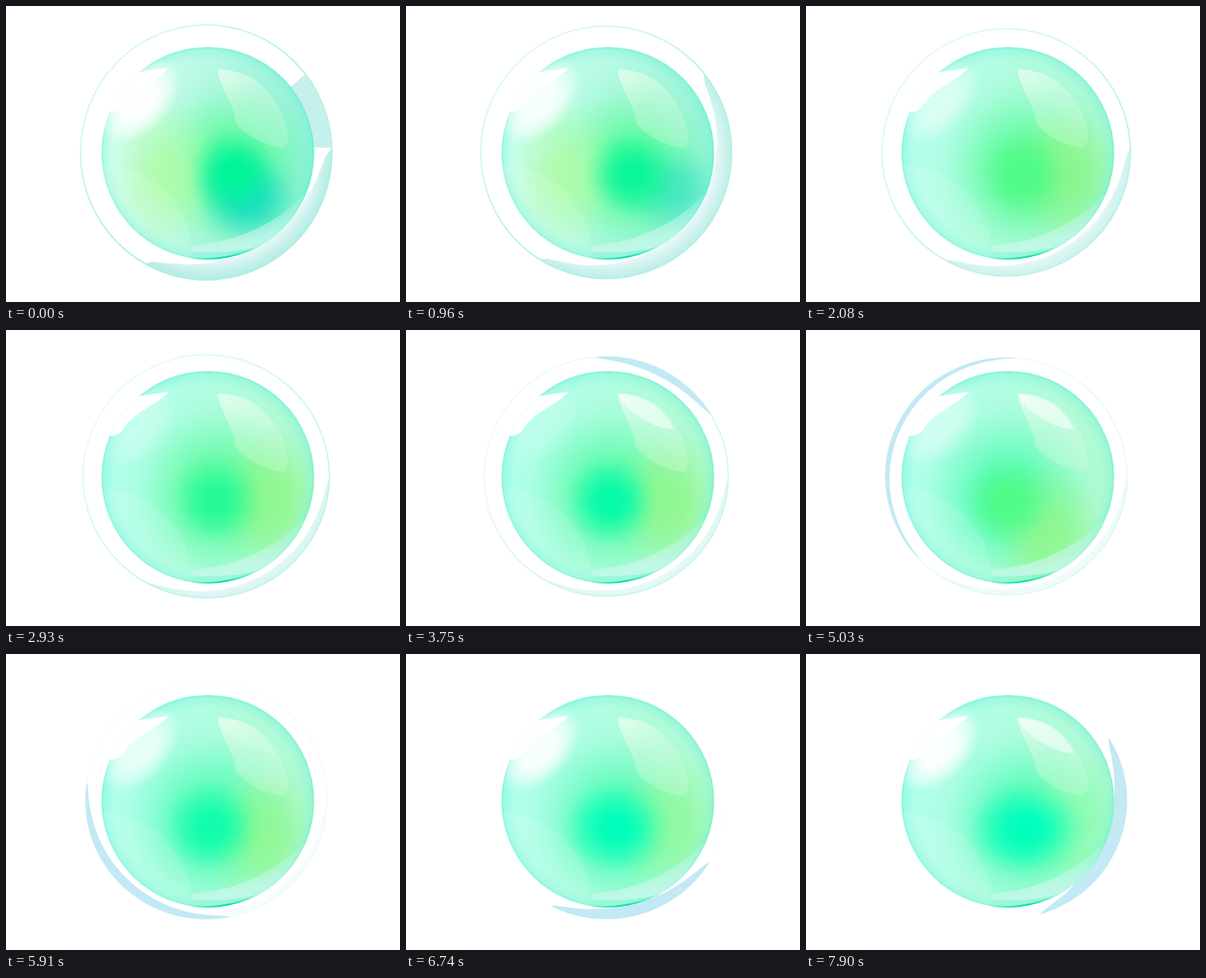
Animation of 492x370 px, one loop 8 s. Source, as an HTML page:

```html
<!DOCTYPE html>
<html lang="en">
<head>
<meta charset="utf-8">
<title>Glass orb</title>
<style>
  html, body { margin: 0; width: 100%; height: 100%; overflow: hidden; background: #fff; }
  svg { display: block; width: 100%; height: 100%; }
</style>
</head>
<body>
<svg viewBox="0 0 492 370">
  <defs id="defs">
    <clipPath id="ball"><circle cx="252" cy="184" r="132.8"/></clipPath>
    <linearGradient id="base" x1="0" y1=".4" x2="1" y2=".6"><stop/><stop offset="1"/></linearGradient>
    <radialGradient id="rim">
      <stop offset=".88" stop-color="#70f0d8" stop-opacity="0"/>
      <stop offset=".97" stop-color="#70f0d8" stop-opacity=".3"/>
      <stop offset="1" stop-color="#48e8cc" stop-opacity=".5"/>
    </radialGradient>
    <radialGradient id="haze">
      <stop offset=".4" stop-color="#fff"/>
      <stop offset=".7" stop-color="#fff" stop-opacity=".6"/>
      <stop offset="1" stop-color="#fff" stop-opacity="0"/>
    </radialGradient>
    <radialGradient id="mint" gradientUnits="userSpaceOnUse" cx="250" cy="183">
      <stop offset=".85" stop-color="#c6f0ec" stop-opacity=".35"/>
      <stop offset=".95" stop-color="#c6f0ec"/>
      <stop offset="1" stop-color="#b4eee4"/>
    </radialGradient>
    <linearGradient id="edge" x1="0" y1="0" x2="1" y2="1">
      <stop offset=".1" stop-color="#a8f2e4" stop-opacity=".45"/>
      <stop offset=".6" stop-color="#a4eee0"/>
    </linearGradient>
    <linearGradient id="shine" x1=".2" y1="0" x2=".8" y2="1">
      <stop stop-color="#f4fff0" stop-opacity=".6"/>
      <stop offset=".4" stop-color="#ecfbe8" stop-opacity=".32"/>
      <stop offset="1" stop-color="#e6f8e4" stop-opacity=".25"/>
    </linearGradient>
    <linearGradient id="sweep" x1=".4" y1=".3" x2=".6" y2=".8">
      <stop stop-color="#c4f6ea" stop-opacity=".25"/>
      <stop offset="1" stop-color="#ccf8ee" stop-opacity=".75"/>
    </linearGradient>
    <linearGradient id="foot">
      <stop stop-color="#00e0b0" stop-opacity="0"/>
      <stop offset=".35" stop-color="#00e0b0"/>
      <stop offset=".65" stop-color="#00e0b0"/>
      <stop offset="1" stop-color="#00e0b0" stop-opacity="0"/>
    </linearGradient>
  </defs>

  <g id="ring"><ellipse id="hoop" cx="250" cy="183" fill="none" stroke="url(#edge)" stroke-width="1.8"/></g>

  <g clip-path="url(#ball)">
    <rect x="119" y="51" width="266" height="266" fill="url(#base)"/>
    <g id="blobs"></g>
    <circle cx="252" cy="184" r="133" fill="url(#rim)"/>
    <path d="M118 200C150 195 190 218 206 240C222 258 234 285 231 318H118Z" fill="#fff" opacity=".1"/>
    <path d="M232 300C290 295 335 273 372 236L378 250C355 285 325 302 294 305C270 308 245 308 232 307Z" fill="url(#sweep)"/>
    <path d="M195 308Q252 327 322 299Q252 333 195 308Z" fill="url(#foot)"/>
    <path d="M264 80C275 78 297 84 307 90C333 106 347 132 351 154C354 170 350 178 342 177C320 174 295 158 287 146C285 122 268 104 264 80Z" fill="url(#shine)"/>
    <path id="glint" fill="#fff" d="M264 80C290 78 325 98 334 124C312 124 275 104 264 80Z"/>
    <ellipse id="cloud" cx="167" cy="119" rx="64" ry="38" transform="rotate(-48 167 119)" fill="url(#haze)"/>
    <path d="M160 84C175 80 192 80 203 77C192 92 160 102 148 122C142 130 138 132 128 133L108 130L130 80Z" fill="#fff"/>
  </g>
</svg>
<script>
const NS = 'http://www.w3.org/2000/svg';
const $ = id => document.getElementById(id);
const LOOP = 8000, HOLD = 145, FIRST = 390;

const lerp = (a, b, u) => a + (b - a) * u;
const clamp = u => Math.min(1, Math.max(0, u));
const ease = (t, a, b) => { const u = clamp((t - a) / (b - a)); return u * u * (3 - 2 * u); };
const bump = (t, mid, width) => Math.exp(-(((t - mid) / width) ** 2));
const rgb = c => typeof c === 'string' ? [1, 3, 5].map(i => parseInt(c.slice(i, i + 2), 16)) : c;
const mix = (a, b, u) => { const q = rgb(b); return rgb(a).map((v, i) => lerp(v, q[i], clamp(u))); };

function set(el, attrs) {
  for (const k in attrs) el.setAttribute(k, attrs[k]);
}
function make(tag, parent, attrs) {
  const el = document.createElementNS(NS, tag);
  set(el, attrs);
  return parent.appendChild(el);
}

// Soft coloured spot whose alpha falls off smoothly from a flat middle
function makeBlob(id) {
  const grad = make('radialGradient', $('defs'), { id });
  const stops = [];
  for (let r = 0; r <= 1; r += 0.125)
    stops.push(make('stop', grad, { offset: r, 'stop-opacity': 1 - ease(r, 0.1, 1) }));
  const el = make('ellipse', $('blobs'), { fill: `url(#${id})` });
  return (cx, cy, rx, ry, color, opacity) => {
    set(el, { cx, cy, rx, ry, opacity });
    for (const s of stops) set(s, { 'stop-color': `rgb(${color.map(Math.round)})` });
  };
}
const [body, glow, teal, core] = ['body', 'glow', 'teal', 'core'].map(makeBlob);

// Stretch of the ring, thickest in the middle; angles in degrees
function makeArc(fill) {
  const el = make('path', $('ring'), { fill });
  return (rx, ry, mid, span, width, taper, opacity) => {
    const n = 48, outer = [], inner = [];
    for (let i = 0; i <= n; i++) {
      const u = i / n, a = (mid + (u - 0.5) * span) * Math.PI / 180;
      const w = width * Math.max(0, Math.sin(Math.PI * u)) ** taper;
      const point = d => `${(250 + (rx - d) * Math.cos(a)).toFixed(2)} ${(183 + (ry - d) * Math.sin(a)).toFixed(2)}`;
      outer.push(point(0));
      inner.unshift(point(w));
    }
    set(el, { d: `M${outer.concat(inner).join('L')}Z`, opacity });
  };
}
const patch = makeArc('#c6f0ec'), shade = makeArc('url(#mint)'), sheen = makeArc('#c2e9f4');

// The blue sheen turns around the ring: time, angle, span, width
const turn = [[3750, 297, 64, 9], [5030, 205, 140, 6], [6740, 65, 82, 15], [7900, 16, 108, 19]];
function along(path, t) {
  const i = Math.max(1, path.findIndex(p => p[0] >= t));
  const a = path[i - 1], b = path[i], u = clamp((t - a[0]) / (b[0] - a[0]));
  return a.map((v, k) => lerp(v, b[k], u));
}

function drawRing(t) {
  const rx = lerp(157, 151, ease(t, 0, 5500)), ry = lerp(160, 148.5, ease(t, -800, 5000));
  const fade = clamp(1 - t / 6700);
  set($('hoop'), { rx, ry, opacity: fade });
  set($('mint'), { r: rx });
  patch(rx, ry, -20, 36, 27, 0.05, bump(t, 0, 450));

  const wrap = bump(t, 1000, 600);
  shade(rx, ry, 60 - 20 * wrap, lerp(118, 165, wrap), lerp(25, 9, ease(t, 0, 3500)), 0.5, fade);

  const [, angle, span, width] = along(turn, Math.min(t, 7900));
  sheen(rx, ry, angle, span, width, 0.6, ease(t, 2700, 3750));
}

function drawBall(t) {
  const swing = ease(t, 900, 2100);
  const warm = ease(t, 0, 2600), late = ease(t, 5200, 7900);
  const calm = bump(t, 2080, 900) + bump(t, 5030, 700);
  const x = 268 + 16 * Math.cos(t * 2 * Math.PI / 9500);
  const y = lerp(209, 219, t / LOOP);

  const sides = [mix('#d4ffee', '#b0ffed', warm), mix('#90f0d8', '#b0f9d0', warm)];
  sides.forEach((c, i) => set($('base').children[i], { 'stop-color': `rgb(${c.map(Math.round)})` }));

  body(x, y - 8, 118, 126, mix('#58fb98', '#48fcb4', ease(t, 2000, 6000)), 0.9);
  glow(lerp(200, 330, swing) - 28 * bump(t, 5030, 800), 212 + 45 * bump(t, 5030, 800), 80, 105,
    mix(mix('#b0fca4', '#90f684', swing), '#90fcac', late), 0.8);
  teal(lerp(302, 336, ease(t, 0, 1000)), 240 - 10 * ease(t, 0, 1000), 72, 66,
    rgb('#14dac4'), 0.9 * bump(t, 0, 1100));
  core(x, y, 62 + 20 * late, 62 + 4 * late, mix(mix('#00f498', '#00ffbc', t / 7000), '#50fb86', calm), 1);

  set($('cloud'), { opacity: 0.15 + 0.8 * Math.cos(Math.PI * t / 7300) ** 2 });
  set($('glint'), { opacity: 0.75 * bump(t, 4400, 1100) + 0.5 * bump(t, 7900, 600) });
}

// The picture holds still first, then advances in short steps
function draw(ms) {
  const t = ms < FIRST ? 0 : FIRST + Math.floor((ms - FIRST) / HOLD) * HOLD;
  drawRing(t);
  drawBall(t);
}

const start = performance.now();
function tick() {
  draw((performance.now() - start) % LOOP);
  requestAnimationFrame(tick);
}
tick();
</script>
</body>
</html>
```
